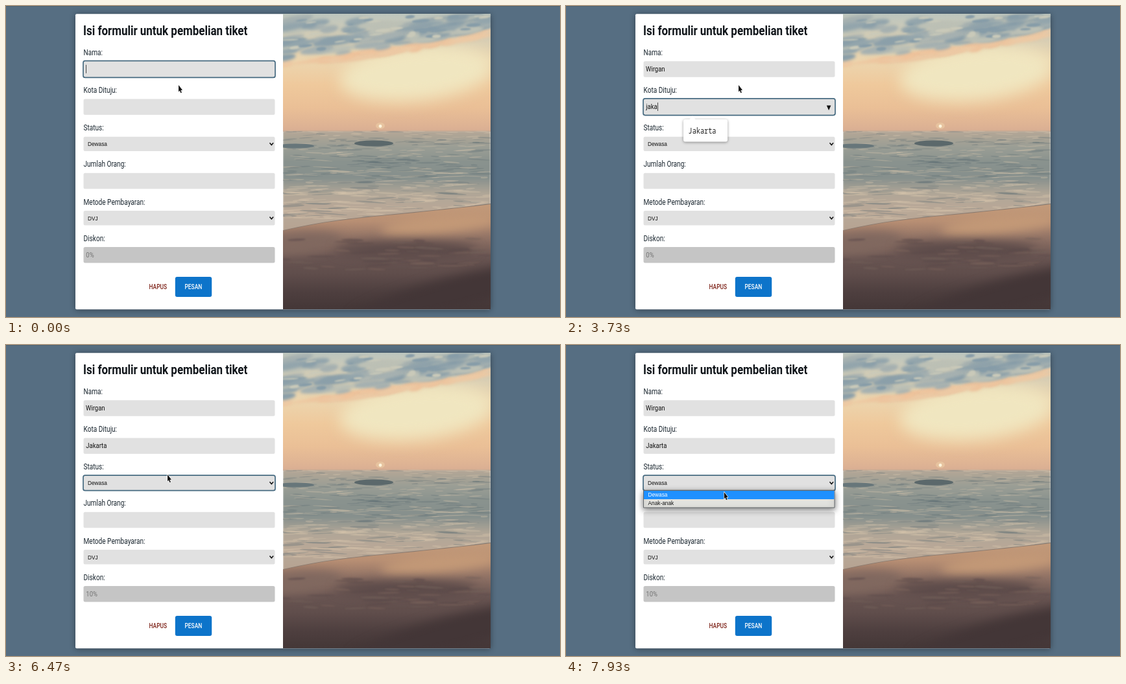
Write an HTML page with a canvas that moves like this. It is 854 by 480 pixels and loops after 8000 ms.

```html
<!DOCTYPE html>
<html lang="id">
<head>
<meta charset="utf-8">
<title>Formulir tiket</title>
<style>
html, body { margin: 0; width: 100%; height: 100%; overflow: hidden; background: #566e82; }
canvas { display: block; }
</style>
</head>
<body>
<canvas id="stage" width="854" height="480"></canvas>
<script>
const LOOP = 8000, SQUASH = 0.84; // the page is seen narrowed as a whole
const NAME = 'Wirgan', TYPED = 'jaka', CITY = 'Jakarta';
const SANS = 'Roboto, "Open Sans", sans-serif';
const INPUT = `11.3px ${SANS}`;
const BUTTON = `500 10px ${SANS}`;
const SELECT = '9.9px "Liberation Sans", Arial, sans-serif';
const MONO = '12.2px "Noto Sans Mono", "DejaVu Sans Mono", monospace';
const FIELDS = [
  { label: 'Nama:' },
  { label: 'Kota Dituju:' },
  { label: 'Status:', value: 'Dewasa' },
  { label: 'Jumlah Orang:' },
  { label: 'Metode Pembayaran:', value: 'DVJ' },
  { label: 'Diskon:', fill: '#c5c5c5' },
];
let nextY = 85.3;
for (const f of FIELDS) {
  f.y = nextY;
  f.h = f.value ? 22.4 : 24.5; // lists are lower than inputs
  nextY += f.h + 33.7;
}

const stage = document.getElementById('stage').getContext('2d');
let g = stage;

let seed = 7;
const rnd = () => (seed = seed * 16807 % 2147483647) / 2147483647;
const between = (a, b) => a + (b - a) * rnd();
const clamp = v => Math.max(0, Math.min(1, v));

function text(s, x, y, font, color) {
  g.save();
  g.translate(x, y);
  g.scale(SQUASH, 1);
  g.font = font;
  g.fillStyle = color;
  g.fillText(s, 0, 0);
  const w = g.measureText(s).width * SQUASH;
  g.restore();
  return x + w;
}

function box(x, y, w, h, r, fill, stroke, line = 1) {
  g.beginPath();
  g.roundRect(x, y, w, h, r);
  if (fill) { g.fillStyle = fill; g.fill(); }
  if (stroke) { g.strokeStyle = stroke; g.lineWidth = line; g.stroke(); }
}

function shadowBox(color, blur, dy, ...args) {
  g.save();
  g.shadowColor = color;
  g.shadowBlur = blur;
  g.shadowOffsetY = dy;
  box(...args);
  g.restore();
}

function triangle(x, y, w, h, color) {
  g.beginPath();
  g.moveTo(x, y);
  g.lineTo(x - w / 2, y + h);
  g.lineTo(x + w / 2, y + h);
  g.fillStyle = color;
  g.fill();
}

function band(y0, y1, ...colors) {
  const f = g.createLinearGradient(0, y0, 0, y1);
  colors.forEach((c, i) => f.addColorStop(i / (colors.length - 1), c));
  g.fillStyle = f;
  g.fillRect(0, y0, 320, y1 - y0);
}

function blob(x, y, rx, ry, color, tilt = 0) {
  g.beginPath();
  g.ellipse(x, y, rx, ry, tilt, 0, 7);
  g.fillStyle = color;
  g.fill();
}

// Scatters flat dabs; place(x) gives the height at x
function dabs(n, place, len, thick, colors, tilt = 0) {
  for (let i = 0; i < n; i++) {
    const x = between(0, 320);
    blob(x, place(x), between(len / 3, len), between(thick / 3, thick),
      colors[i % colors.length], tilt + between(-.06, .06));
  }
}

// Seaside photo, 320 x 456, as soft shapes
function photo() {
  g.save();
  g.translate(427, 12);
  g.beginPath();
  g.rect(0, 0, 320, 456);
  g.clip();

  const cloud = x => 68 - .06 * x - .0003 * x * x;
  band(0, 182, '#bcc5be', '#d5cdb5', '#ecd5ae', '#efc99c', '#eabf96', '#d9ae93');
  g.filter = 'blur(12px)';
  blob(205, 92, 118, 42, '#f0e6c0', -.1);
  g.filter = 'blur(2px)';
  dabs(40, x => cloud(x) + between(2, 12), 30, 5, ['#eec39c', '#ecc9a4'], -.15);
  dabs(90, x => cloud(x) * between(.15, 1), 34, 7, ['#93a5ac', '#a5b0b0', '#bcc0b5', '#8b9fa9'], -.15);
  g.filter = 'blur(1px)';
  dabs(36, x => cloud(x) * between(.1, 1), 14, 3, ['#c9c9b9', '#869ca8'], -.1);

  // sea: darker swells in two bands, finer toward the horizon
  band(181, 350, '#b5a796', '#9b9e95', '#89928e', '#87908d', '#b0a697', '#b9a897', '#b7a594', '#b39d8c');
  g.filter = 'blur(.6px)';
  for (let i = 0; i < 420; i++) {
    const y = 181 + 135 * rnd(), depth = (y - 181) / 135;
    const swell = Math.exp(-(((y - 200) / 7) ** 2)) + Math.exp(-(((y - 232) / 9) ** 2));
    const color = rnd() < .3 + .6 * swell ? '#5c6d7250' : '#dcc8ae50';
    blob(320 * rnd(), y, between(5, 14 + 16 * depth), between(.4, 1 + depth), color, between(-.08, .08));
  }
  blob(140, 200, 30, 4.5, '#5b686b');
  blob(20, 204, 28, 3.5, '#67767a');
  g.filter = 'none';
  blob(150, 173, 7, 5, '#f6dbb066');
  blob(150, 173.5, 2.4, 2.4, '#fff4dc');

  // wet sand below a curved waterline
  g.beginPath();
  g.moveTo(0, 335);
  g.bezierCurveTo(100, 312, 150, 315, 320, 294);
  g.strokeStyle = '#8a7a6f';
  g.lineWidth = 2;
  g.stroke();
  g.lineTo(320, 456);
  g.lineTo(0, 456);
  g.clip();
  band(294, 456, '#c49c7b', '#b78e73', '#8d7064', '#695552', '#5f4d4b', '#4e3f3f', '#443737');
  g.filter = 'blur(8px)';
  blob(20, 355, 70, 17, '#80685f', -.1);
  blob(240, 325, 90, 14, '#c39977', -.1);
  blob(190, 364, 110, 13, '#5b4a49');
  blob(270, 430, 170, 26, '#433637', -.25);
  g.filter = 'blur(1px)';
  dabs(50, () => between(345, 395), 24, 2, ['#5a494a90', '#72605990', '#7f665d70']);
  g.restore();
}

function chevron(y) {
  g.beginPath();
  g.moveTo(406.5, y - 1.6);
  g.lineTo(409.3, y + 1.6);
  g.lineTo(412.1, y - 1.6);
  g.strokeStyle = '#111';
  g.lineWidth = 1.5;
  g.stroke();
}

function page() {
  g.fillStyle = '#566e82';
  g.fillRect(0, 0, 854, 480);
  g.fillStyle = '#4e6270';
  g.fillRect(0, 0, 854, 1);
  shadowBox('#0006', 10, 1, 107, 12.3, 640, 456, 2, '#fff');
  photo();
  text('Isi formulir untuk pembelian tiket', 119, 45, `600 20.2px ${SANS}`, '#10151a');
  for (const { label, value, fill, y, h } of FIELDS) {
    text(label, 119.5, y - 9.5, `12px ${SANS}`, '#1b2730');
    box(119.5, y, 295, h, 2.5, fill || '#e1e1e1');
    if (value) {
      text(value, 126, y + 14.7, SELECT, '#111');
      chevron(y + 11.2);
    }
  }
  text('HAPUS', 220.5, 437, BUTTON, '#7d2218');
  box(260.8, 418, 56.4, 31, 3, '#0d74ca');
  text('PESAN', 275.5, 437, BUTTON, '#fff');
}

const backdrop = document.createElement('canvas');
backdrop.width = 854;
backdrop.height = 480;
g = backdrop.getContext('2d');
page();
g = stage;

// Moments of the story, ms
const TO_CITY = 1735, HIGHLIGHT = 3870, CHOOSE = 4070, DISCOUNT = 4270;
const TO_STATUS = 4870, BLUR = 6670, OPEN = 7530, BLINK = 267;
const nameKeys = [...NAME].map((_, i) => 800 + 200 * i ** .8);
const cityKeys = [...TYPED].map((_, i) => 3270 + 110 * i);
const resets = [70, ...nameKeys, TO_CITY, ...cityKeys, CHOOSE];
const typed = (s, keys, t) => s.slice(0, keys.filter(k => t >= k).length);

function focused(t) {
  if (t < TO_CITY) return 0;
  if (t < TO_STATUS) return 1;
  return t < BLUR || t >= OPEN ? 2 : -1;
}

// Every key and focus change restarts the blinking caret
function caret(t, x, y) {
  const since = t - Math.max(...resets.filter(k => k <= t));
  if (since < 0 || Math.floor(since / BLINK) % 2) return;
  g.fillStyle = '#222';
  g.fillRect(Math.round(x), y + 5.5, 0.8, 13);
}

// Pointer moves: begin, end, x, y
const MOVES = [
  [5600, 5930, 250, 182], [5930, 6200, 249, 200],
  [6800, 7070, 246, 220], [7600, 7930, 243.7, 227],
];

function pointer(t) {
  let x = 266, y = 122;
  for (const [t0, t1, x1, y1] of MOVES) {
    const k = clamp((t - t0) / (t1 - t0));
    x += (x1 - x) * k;
    y += (y1 - y) * k;
  }
  g.save();
  g.translate(x, y);
  const arrow = new Path2D('M0 0V10.5L1.9 8.6 3.3 12.2 4.9 11.5 3.5 8 6 7.8Z');
  g.lineJoin = 'round';
  g.strokeStyle = '#fff';
  g.lineWidth = 1.3;
  g.stroke(arrow);
  g.fillStyle = '#111';
  g.fill(arrow);
  g.restore();
}

function suggestion(t) {
  const alpha = clamp((t - 3330) / 140) * clamp((DISCOUNT - t) / 200);
  if (!alpha) return;
  g.save();
  g.globalAlpha = alpha;
  shadowBox('#0006', 4, 1, 181, 175, 68, 34.5, 3, '#fff');
  triangle(195, 169.5, 10, 6, '#fff');
  if (t >= HIGHLIGHT) box(181, 178, 68, 28, 0, '#eee');
  text(CITY, 188.5, 197, MONO, '#222');
  g.restore();
}

function dropdown() {
  box(119, 238, 100, 18, 0, '#fff'); // hides the next label
  shadowBox('#0008', 10, 3, 119.5, 224.5, 294.5, 26.5, 0, '#e3e3df', '#62666a');
  box(120, 225, 293.5, 13, 0, '#1e90ff');
  text('Dewasa', 126.5, 234.4, SELECT, '#fff');
  text('Anak-anak', 126.5, 247.4, SELECT, '#111');
}

function draw(t) {
  const [name, city, , , , discount] = FIELDS;
  const active = focused(t);
  g.drawImage(backdrop, 0, 0);
  if (active >= 0) {
    const { y, h } = FIELDS[active];
    box(119, y - .6, 296, h + 1.2, 3, null, '#466a80', 1.7);
  }

  const nameEnd = text(typed(NAME, nameKeys, t), 123, name.y + 15.7, INPUT, '#111');
  if (active === 0) caret(t, nameEnd, name.y);

  const cityText = t >= CHOOSE ? CITY : typed(TYPED, cityKeys, t);
  const cityEnd = text(cityText, 123.3, city.y + 15.7, INPUT, '#111');
  if (active === 1) caret(t, cityEnd, city.y);

  g.globalAlpha = clamp((t - 1800) / 200) * (t < 5870);
  triangle(405.1, 161, 6.6, -7.4, '#111');
  g.globalAlpha = 1;

  text(t < DISCOUNT ? '0%' : '10%', 123.3, discount.y + 15.6, INPUT, '#747474');
  suggestion(t);
  if (t >= OPEN) dropdown();
  pointer(t);
}

const start = performance.now();
function frame() {
  draw((performance.now() - start) % LOOP);
  requestAnimationFrame(frame);
}
frame();
</script>
</body>
</html>
```
